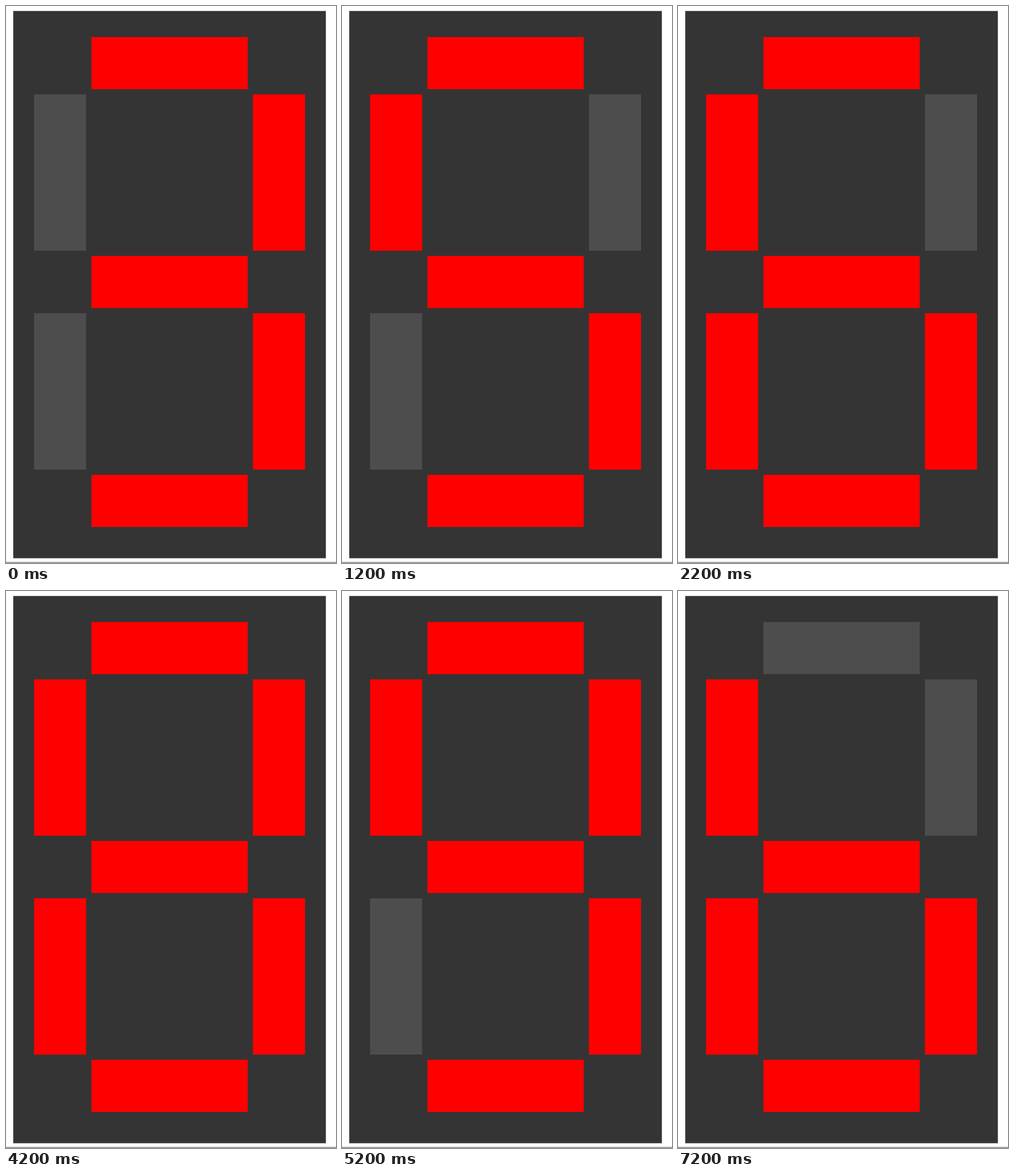
These frames come from a looping animation (576x972 px, 8 s). An HTML page:

```html
<!DOCTYPE html>
<html lang="en">
<head>
<meta charset="utf-8">
<title>Seven-segment counter</title>
<style>
html, body { margin: 0; width: 100%; height: 100%; overflow: hidden; background: #fff; }
svg { display: block; width: 576px; height: 972px; }
</style>
</head>
<body>
<svg viewBox="0 0 576 972">
  <rect width="576" height="972" fill="#fff"/>
  <g id="panel" transform="translate(12.6 8.7) scale(9.095)">
    <rect width="60" height="105" fill="#343434"/>
  </g>
  <rect y="970.2" width="576" height="1.3" fill="#777"/>
</svg>
<script>
const ON = '#f00', OFF = '#4d4d4d';
const LOOP = 8000, STEP = 1000, FIRST = 200;

// Top-left corners in panel units; a, d and g lie flat.
const corners = {
  a: [15, 5], b: [46, 16], c: [46, 58], d: [15, 89],
  e: [4, 58], f: [4, 16], g: [15, 47]
};

// Lit segments for 3 4 5 6 7 8 9 A b
const digits = ['abcdg', 'bcfg', 'acdfg', 'acdefg', 'abc',
                'abcdefg', 'abcdfg', 'abcefg', 'cdefg'];

const panel = document.getElementById('panel');
const segments = {};
for (const [name, [x, y]] of Object.entries(corners)) {
  const flat = 'adg'.includes(name);
  const rect = document.createElementNS('http://www.w3.org/2000/svg', 'rect');
  const attrs = { x, y, width: flat ? 30 : 10, height: flat ? 10 : 30 };
  for (const key in attrs) rect.setAttribute(key, attrs[key]);
  panel.append(rect);
  segments[name] = rect;
}

function draw(t) {
  const lit = digits[Math.floor((t - FIRST) / STEP) + 1];
  for (const name in segments) {
    segments[name].setAttribute('fill', lit.includes(name) ? ON : OFF);
  }
}

const start = performance.now();
function tick() {
  draw((performance.now() - start) % LOOP);
  requestAnimationFrame(tick);
}
draw(0);
requestAnimationFrame(tick);
</script>
</body>
</html>
```
